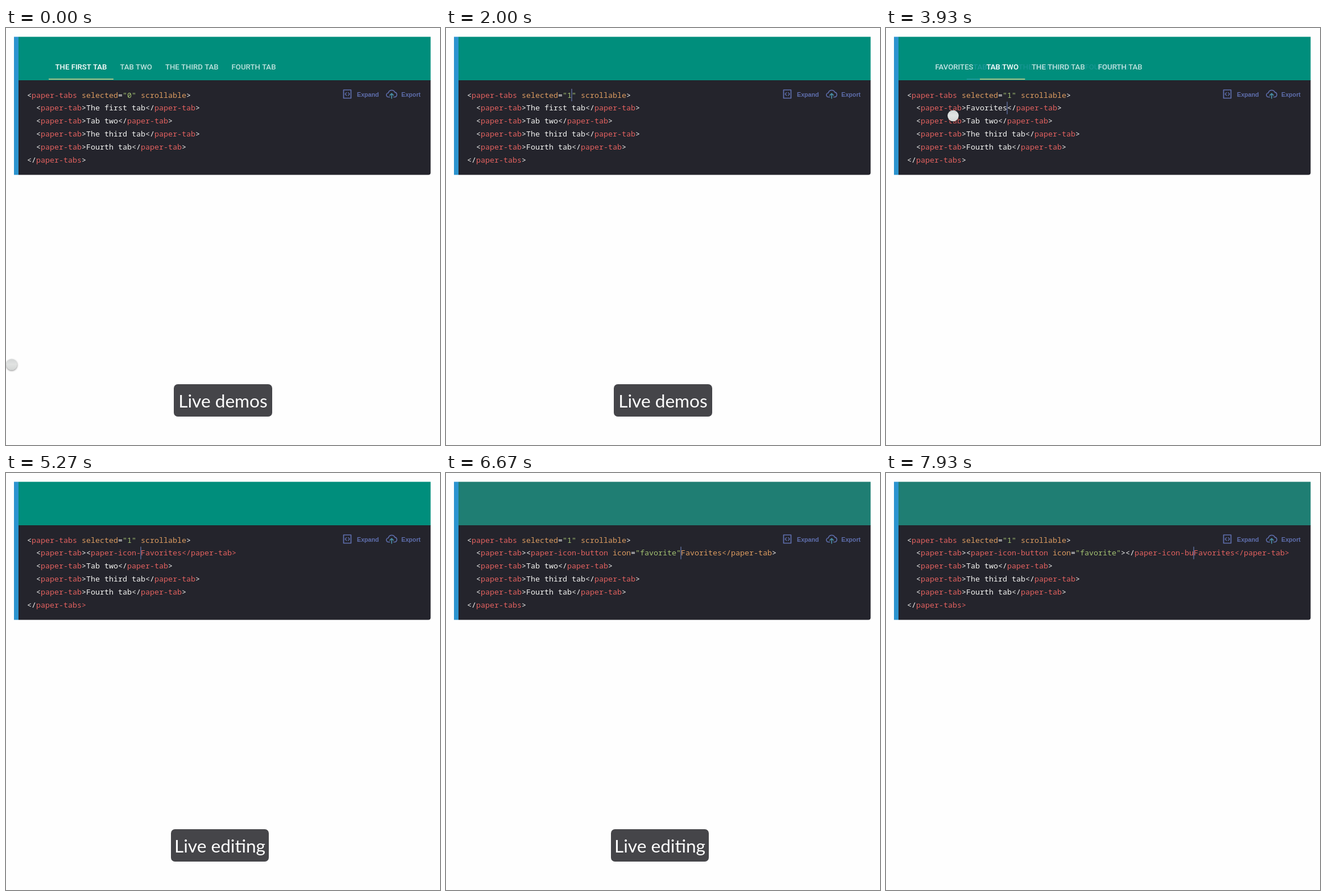
An HTML page with a canvas for the animation above (8000 ms loop, 763x734 px).

```html
<!DOCTYPE html>
<html lang="en">
<head>
<meta charset="utf-8">
<title>Live demos</title>
<style>
html, body { margin: 0; width: 100%; height: 100%; overflow: hidden; background: #fefefe; }
canvas { display: block; width: 763px; height: 734px; }
</style>
</head>
<body>
<canvas id="stage" width="763" height="734"></canvas>
<script>
const c = document.getElementById('stage').getContext('2d');
const LOOP = 8000, CH = 8, CODE_X = 37, LINE_Y = 118, LINE_H = 22.8;
const WHITE = '#f4f4f2', RED = '#e3615f', ORANGE = '#dc9c60', GREEN = '#a3c171', BLUE = '#5f6fae';
const TAB_FONT = '500 13.2px Roboto, sans-serif';

const clamp = v => Math.max(0, Math.min(1, v));
const ramp = (t, from, len) => clamp((t - from) / len);
const ease = p => p * p * (3 - 2 * p);
const mix = (a, b, p) => a + (b - a) * p;

// Pointer path: time, x, y
const path = [
  [130, 10, 593], [330, 237, 71], [620, 237, 71], [710, 132, 72], [780, 132, 72],
  [930, 328, 81], [1130, 328, 81], [1330, 223, 119], [2520, 223, 119], [2650, 246, 141],
  [2720, 246, 141], [2990, 141, 135], [3080, 141, 135], [3300, 118, 155], [4270, 118, 155], [4400, 141, 151]
];
// Clicks on tabs: time, tab, x, y
const clicks = [[480, 1, 237, 71], [720, 0, 132, 72], [970, 2, 328, 81]];
// Typing: start, ms per key, keys ("\b" deletes)
const bursts = [
  [4700, 50, '<paper-icon-button icon="favou'],
  [6270, 50, '\b'],
  [6400, 65, 'rite"><'],
  [7140, 60, '/paper-icon-bu']
];

function pointer(t) {
  let a = path[0];
  for (const b of path) {
    if (t < b[0]) {
      if (t <= a[0]) return [a[1], a[2]];
      const p = ease(ramp(t, a[0], b[0] - a[0]));
      return [mix(a[1], b[1], p), mix(a[2], b[2], p)];
    }
    a = b;
  }
  return [a[1], a[2]];
}

const keysAt = (t, start, step, text) =>
  t < start ? '' : text.slice(0, Math.floor((t - start) / step) + 1);

function inserted(t) {
  let s = '';
  for (const b of bursts)
    for (const k of keysAt(t, ...b)) s = k === '\b' ? s.slice(0, -1) : s + k;
  return s;
}

function text(s, x, y, font, color) {
  c.font = font;
  c.fillStyle = color;
  c.fillText(s, x, y);
}

function box(x, y, w, h, color, r = 0) {
  c.fillStyle = color;
  c.beginPath();
  c.roundRect(x, y, w, h, r);
  c.fill();
}

// Small markup highlighter: returns [chunk, color] pairs
function highlight(line) {
  const out = [];
  let state = 'text';
  const put = (ch, color) => {
    const last = out[out.length - 1];
    if (last && last[1] === color) last[0] += ch;
    else out.push([ch, color]);
  };
  for (let i = 0; i < line.length; i++) {
    const ch = line[i];
    if (state === 'text') {
      put(ch, WHITE);
      if (ch === '<') {
        if (line[i + 1] === '/') put(line[++i], WHITE);
        state = 'name';
      }
    } else if (state === 'string') {
      put(ch, GREEN);
      if (ch === '"') state = 'attr';
    } else if (state === 'broken') {
      put(ch, RED);
    } else if (ch === '>') {
      put(ch, WHITE);
      state = 'text';
    } else if (ch === '"') {
      put(ch, GREEN);
      state = 'string';
    } else if (ch === ' ') {
      put(ch, WHITE);
      state = 'attr';
    } else if (state === 'name') {
      if (ch === '<') state = 'broken';
      put(ch, RED);
    } else {
      put(ch, ch === '=' ? WHITE : ORANGE);
    }
  }
  return { out, broken: state === 'broken' };
}

function codeLine(chunks, row) {
  let x = CODE_X;
  for (const [s, color] of chunks) {
    text(s, x, LINE_Y + row * LINE_H + 4.5, '500 13.333px "Noto Sans Mono", monospace', color);
    x += s.length * CH;
  }
}

const caret = (x, row) => box(x - 0.7, LINE_Y + row * LINE_H - 11, 1.4, 22, '#60709f');

function drawCode(t) {
  const start = CODE_X + 13 * CH;
  const ins = inserted(t);
  const body = t < 3400 ? 'The first tab' : keysAt(t, 3400, 50, 'Favorites');
  const value = t < 1670 ? '0' : t < 1870 ? '' : '1';

  if (t > 2720 && t < 3400) {
    const from = Math.max(start, start + Math.round((pointer(t)[0] - start) / CH) * CH);
    const left = t > 2990 ? start : from;
    box(left, 130, start + 13 * CH - left, 22, '#49343b');
  }
  const lines = [
    `<paper-tabs selected="${value}" scrollable>`,
    `  <paper-tab>${ins}${body}</paper-tab>`,
    '  <paper-tab>Tab two</paper-tab>',
    '  <paper-tab>The third tab</paper-tab>',
    '  <paper-tab>Fourth tab</paper-tab>',
    '</paper-tabs>'
  ].map(highlight);
  if (lines[1].broken || ins.includes('">')) lines[5].out = [['</', WHITE], ['paper-tabs>', RED]];
  lines.forEach((l, i) => codeLine(l.out, i));

  if (t >= 1470 && t < 2400) caret(CODE_X + (22 + value.length) * CH, 0);
  if (t >= 3400 && t < 4400) caret(start + body.length * CH, 1);
  if (t >= 4600) caret(start + ins.length * CH, 1);
}

// Tab boxes for a given first label; an empty one leaves room for an icon button
function layout(first) {
  c.font = TAB_FONT;
  let x = 75;
  return [first, 'TAB TWO', 'THE THIRD TAB', 'FOURTH TAB'].map(label => {
    const w = (label ? c.measureText(label).width : 38) + 23;
    const tab = { label, x, w };
    x += w;
    return tab;
  });
}

function drawTabs(tabs, lit, bar, alpha = 1, tint = '#fff') {
  tabs.forEach((tab, i) => {
    c.globalAlpha = alpha * mix(0.74, 1, lit(i));
    text(tab.label, tab.x + 11.5, 73, TAB_FONT, tint);
  });
  c.globalAlpha = alpha;
  box(bar[0], 89, bar[1] - bar[0], 2, tint === '#fff' ? '#a9c086' : tint);
  c.globalAlpha = 1;
}

const span = tab => [tab.x, tab.x + tab.w];

function drawClickable(t) {
  const tabs = layout('THE FIRST TAB');
  const level = [1, 0, 0, 0];
  let bar = span(tabs[0]), prev = 0;
  for (const [at, i, x, y] of clicks) {
    if (t < at) break;
    const tab = tabs[i], age = t - at;
    if (age < 420) {
      c.save();
      c.beginPath();
      c.rect(tab.x, 42, tab.w, 50);
      c.clip();
      c.globalAlpha = 0.16 * (1 - ramp(age, 180, 240));
      c.fillStyle = '#e4eb9b';
      c.beginPath();
      c.arc(x, y, 16 + age * 0.24, 0, 7);
      c.fill();
      c.restore();
    }
    level[prev] = 1 - ramp(age, 30, 100);
    level[i] = ramp(age, 0, 30);
    // The bar stretches over both tabs, then shrinks onto the new one
    const a = span(tabs[prev]), b = span(tab);
    const grow = ease(ramp(age, 20, 110)), shrink = ease(ramp(age, 130, 110));
    const wide = [Math.min(a[0], b[0]), Math.max(a[1], b[1])];
    bar = [0, 1].map(k => mix(mix(a[k], wide[k], grow), b[k], shrink));
    prev = i;
  }
  drawTabs(tabs, i => level[i], bar);
}

function drawSecond(first, alpha, tint) {
  const tabs = layout(first);
  drawTabs(tabs, i => +(i === 1), span(tabs[1]), alpha, tint);
}

function drawDemo(t) {
  if (t < 1700) drawClickable(t);
  else if (t < 2070) return;
  else if (t < 3450) drawSecond('THE FIRST TAB', ramp(t, 2070, 200));
  else if (t < 3650) return;
  else if (t < 3860) drawSecond('FAVORI', ramp(t, 3650, 120));
  else if (t < 4750) {
    const ghost = 0.65 * (1 - ramp(t, 3950, 300));
    if (ghost) drawSecond('FAVORI', ghost, '#2e9da9');
    drawSecond('FAVORITES', ramp(t, 3840, 80));
  } else if (t >= 6860 && t < 7170) drawSecond('', ramp(t, 6860, 140));
}

function drawTools() {
  c.strokeStyle = BLUE;
  c.lineWidth = 1.7;
  c.lineJoin = c.lineCap = 'round';
  c.stroke(new Path2D('M593.5 109h13v14.5h-13z'));
  c.lineWidth = 1.3;
  c.stroke(new Path2D('M598.6 113.6l-2.5 2.6 2.5 2.6M601.6 113.6l2.5 2.6-2.5 2.6'));
  c.lineWidth = 1.6;
  c.stroke(new Path2D('M674.5 121.5h-2a3.6 3.6 0 0 1-.3-7.2 6 6 0 0 1 11.4-1.2 4.3 4.3 0 0 1 .2 8.4h-2.2'));
  c.strokeStyle = '#4a91a8';
  c.stroke(new Path2D('M678 124v-8.4M674.9 118.4l3.1-3.1 3.1 3.1'));
  const font = 'bold 10.7px "Liberation Sans", Arial, sans-serif';
  text('Expand', 617, 121, font, BLUE);
  text('Export', 695, 121, font, BLUE);
}

function drawLabel(s, x, w, alpha) {
  if (!alpha) return;
  c.globalAlpha = alpha;
  box(x, 627, w, 57, '#454549', 7);
  c.textAlign = 'center';
  text(s, x + w / 2, 668, '31.6px Lato, sans-serif', '#fff');
  c.textAlign = 'left';
  c.globalAlpha = 1;
}

function drawPointer(t) {
  if ((t >= 1670 && t < 2500) || t >= 4700) return;
  const [x, y] = pointer(t);
  const g = c.createLinearGradient(0, y - 10, 0, y + 10);
  g.addColorStop(0, '#d3d6d6');
  g.addColorStop(0.45, '#e1e3e2');
  g.addColorStop(1, '#d2d5d4');
  c.save();
  c.shadowColor = 'rgba(0,0,0,.45)';
  c.shadowBlur = 3;
  c.shadowOffsetY = 1;
  c.fillStyle = g;
  c.beginPath();
  c.arc(x, y - 0.5, 9.8, 0, 7);
  c.fill();
  c.restore();
}

function draw(t) {
  box(0, 0, 763, 734, '#fefefe');
  box(14, 15.5, 8, 243, '#2c94cf');
  box(22, 15.5, 724.5, 77, t < 6500 ? '#008e7c' : '#1f7e73');
  box(22, 92, 724.5, 166.5, '#24242c', [0, 0, 4, 0]);
  drawDemo(t);
  drawTools();
  drawCode(t);
  drawLabel('Live demos', 295, 173, 1 - ramp(t, 3200, 130));
  drawLabel('Live editing', 290, 172, ramp(t, 4270, 130) * (1 - ramp(t, 7550, 130)));
  drawPointer(t);
}

function frame() {
  draw(performance.now() % LOOP);
  requestAnimationFrame(frame);
}
frame();
</script>
</body>
</html>
```
